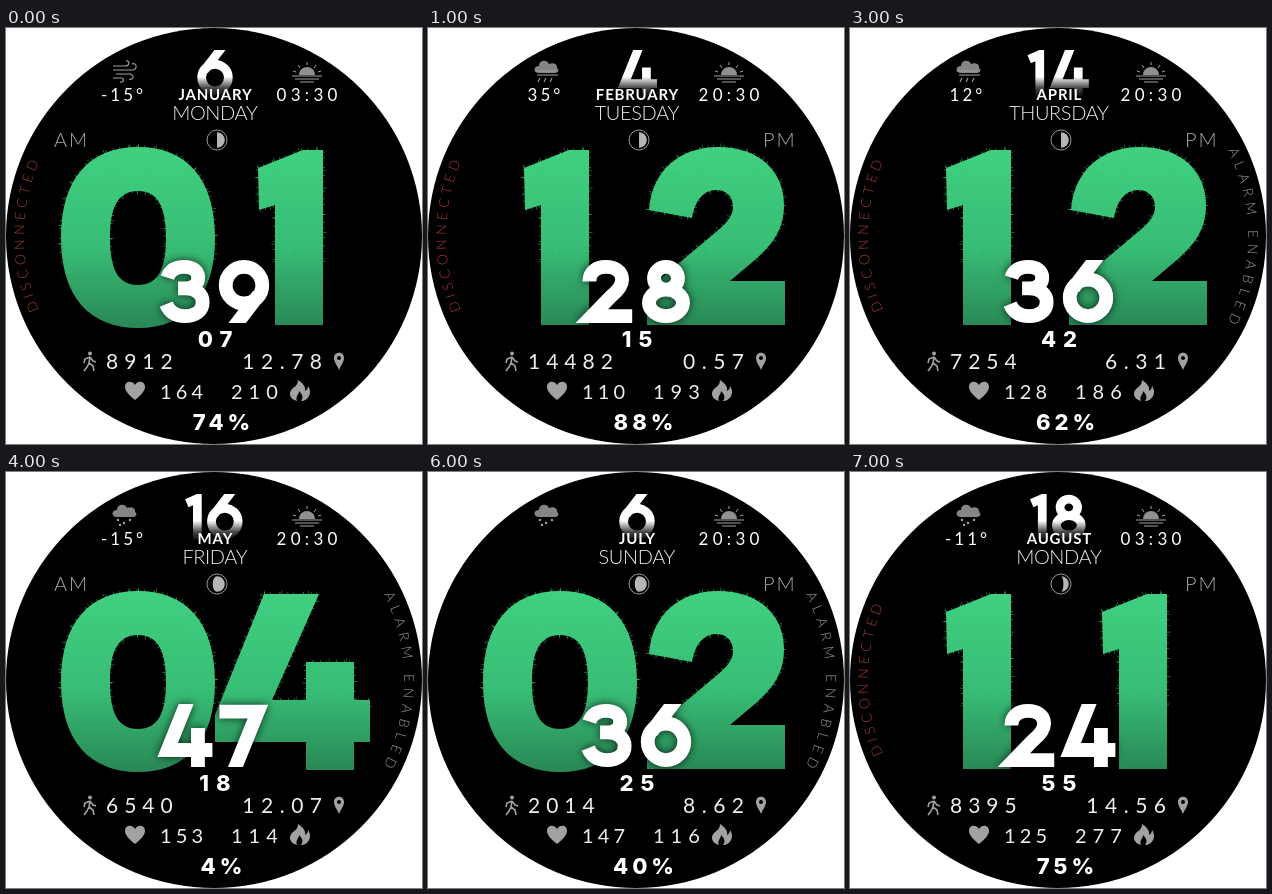
An HTML page with a canvas that plays this animation: 416x416 px, repeating every 8 s.

```html
<!DOCTYPE html>
<html lang="en">
<head>
<meta charset="utf-8">
<title>Watch face</title>
<style>
html, body { margin: 0; width: 100%; height: 100%; overflow: hidden; background: #fff; }
canvas { display: block; width: 416px; height: 416px; }
</style>
</head>
<body>
<canvas id="face" width="416" height="416"></canvas>
<script>
const SIZE = 416, STEP = 1000;
const ctx = document.getElementById('face').getContext('2d');
const layer = document.createElement('canvas');
layer.width = layer.height = SIZE;
const layerCtx = layer.getContext('2d');
const GREY = '#a2a2a2';

// day, month, weekday, temperature, sky, sun time, half of day, hour, minute, second,
// steps, distance, pulse, calories, battery, moon, disconnected, alarm
const KEYS = 'day month weekday temp sky sun half hour min sec steps dist pulse kcal battery moon off alarm'.split(' ');
const states = [
  '6|JANUARY|MONDAY|-15°|wind|03:30|AM|01|39|07|8912|12.78|164|210|74|0|1|',
  '4|FEBRUARY|TUESDAY|35°|rain|20:30|PM|12|28|15|14482|0.57|110|193|88|0|1|',
  '5|MARCH|WEDNESDAY|4°|snow|03:30|AM|01|48|26|12103|9.49|140|101|47|0|1|',
  '14|APRIL|THURSDAY|12°|rain|20:30|PM|12|36|42|7254|6.31|128|186|62|0|1|1',
  '16|MAY|FRIDAY|-15°|snow|20:30|AM|04|47|18|6540|12.07|153|114|4|0.55||1',
  '8|JUNE|SATURDAY|21°|snow|03:30|AM|01|24|33|9308|4.85|136|152|56|0.55|1|1',
  '6|JULY|SUNDAY||snow|20:30|PM|02|36|25|2014|8.62|147|116|40|0.55||1',
  '18|AUGUST|MONDAY|-11°|snow|03:30|PM|11|24|55|8395|14.56|125|277|75|-0.3|1|'
].map(row => Object.fromEntries(row.split('|').map((v, i) => [KEYS[i], v])));

// Strokes in a box 100 units tall: [width, path]
const digits = {
  1: [34, 'M0 20 L23 10 V100'],
  2: [80, 'M12 34 C12 18 24 11 38 11 C54 11 64 19 64 31 C64 42 56 50 46 58 L16 89 H80'],
  3: [78, 'M11 28 C15 16 25 11 38 11 C52 11 60 18 60 28 C60 39 50 45 40 45 H28 M40 45 C56 45 67 54 67 67 C67 81 55 89 39 89 C24 89 14 82 9 70'],
  4: [87, 'M47 -4 L16 73 H87 M64 38 V100'],
  5: [76, 'M69 11 H25 L20 48 C26 43 32 41 40 41 C55 41 65 51 65 65 C65 80 54 89 38 89 C25 89 15 83 10 73'],
  6: [80, 'M57 -8 L17 44 M69 60 A29 29 0 1 1 11 60 A29 29 0 1 1 69 60'],
  7: [78, 'M0 12 H61 L23 106'],
  8: [76, 'M57 29 A19 18 0 1 1 19 29 A19 18 0 1 1 57 29 M65 68 A27 21 0 1 1 11 68 A27 21 0 1 1 65 68'],
  9: [80, 'M23 108 L63 56 M69 40 A29 29 0 1 1 11 40 A29 29 0 1 1 69 40']
};
for (const key in digits) digits[key][1] = new Path2D(digits[key][1]);

const hours = {
  zero: 'M132 119 C181 119 209 151 209 210 C209 268 181 300 132 300 C83 300 55 268 55 210 C55 151 83 119 132 119 Z M132 163 C112 163 104 179 104 210 C104 241 112 257 132 257 C152 257 160 241 160 210 C160 179 152 163 132 163 Z',
  one: 'M252 140 L297 122 H317 V297 H269 V177 L253 182 Z',
  two: 'M221 182 C224 142 252 119 290 119 C331 119 356 143 356 177 C356 201 345 216 328 231 L302 253 H357 V297 H219 V262 L288 204 C299 195 305 188 305 179 C305 168 298 162 288 162 C275 162 267 173 264 190 Z',
  four: 'M258 122 H313 L266 228 H300 V190 H348 V228 H364 V270 H348 V298 H300 V270 H209 V243 Z'
};
const hourPaths = [hours.zero, hours.one, hours.two, , hours.four].map(d => new Path2D(d));

const green = ctx.createLinearGradient(0, 120, 0, 299);
green.addColorStop(0, '#40d080');
green.addColorStop(0.55, '#38bd75');
green.addColorStop(1, '#298856');

function text(value, x, y, font, { color = '#fff', align = 'left', gap = 0 } = {}) {
  ctx.font = font;
  ctx.fillStyle = color;
  ctx.letterSpacing = gap + 'px';
  ctx.textAlign = 'left';
  const width = ctx.measureText(value).width - gap;
  const shift = { left: 0, center: width / 2, right: width }[align];
  ctx.fillText(value, x - shift, y);
  ctx.letterSpacing = '0px';
}

const lato = (weight, size) => `${weight} ${size}px Lato, sans-serif`;
const heavy = size => `800 ${size}px Inter, sans-serif`;

function line(d, width = 1.2, color = GREY) {
  ctx.strokeStyle = color;
  ctx.lineWidth = width;
  ctx.stroke(new Path2D(d));
}

function shape(d, color = GREY) {
  ctx.fillStyle = color;
  ctx.fill(new Path2D(d));
}

function dot(x, y, r, color = GREY) {
  ctx.fillStyle = color;
  ctx.beginPath();
  ctx.arc(x, y, r, 0, Math.PI * 2);
  ctx.fill();
}

function digit(c, char, x, y, height, weight, color) {
  const [width, path] = digits[char];
  c.save();
  c.translate(x, y);
  c.scale(height / 100, height / 100);
  c.beginPath();
  c.rect(-10, 0, width + 20, 100);
  c.clip();
  c.strokeStyle = color;
  c.lineWidth = weight;
  c.miterLimit = 6;
  c.stroke(path);
  c.restore();
}

function drawDate(day) {
  const scale = 0.46, gap = 4;
  const widths = [...day].map(ch => digits[ch][0] * scale);
  let x = 209 - (widths.reduce((a, b) => a + b) + gap * (day.length - 1)) / 2;
  const fade = ctx.createLinearGradient(0, 0, 0, 100);
  fade.addColorStop(0, '#fff');
  fade.addColorStop(0.58, '#fff');
  fade.addColorStop(0.82, '#484848');
  fade.addColorStop(1, '#0c0c0c');
  [...day].forEach((ch, i) => {
    digit(ctx, ch, x, 22, 46, 19, fade);
    x += widths[i] + gap;
  });
}

function drawHour(value) {
  [...value].forEach((ch, i) => {
    const path = hourPaths[ch];
    ctx.save();
    if (i === 0 && ch !== '0') ctx.translate(-156, 0);
    ctx.fillStyle = green;
    ctx.fill(path, 'evenodd');
    // Short bristles along the upper edges
    ctx.beginPath();
    ctx.rect(0, 110, SIZE, 126);
    ctx.clip();
    ctx.strokeStyle = green;
    ctx.globalAlpha = 0.65;
    for (const [width, dash] of [[4, [0.8, 5, 0.6, 9, 1, 7]], [7, [0.6, 17, 0.7, 26]]]) {
      ctx.lineWidth = width;
      ctx.setLineDash(dash);
      ctx.stroke(path);
    }
    // Fine specks in the fill
    ctx.clip(path, 'evenodd');
    let seed = 7;
    const random = () => (seed = seed * 16807 % 2147483647) / 2147483647;
    ctx.globalAlpha = 0.35;
    for (let n = 0; n < 260; n++) {
      ctx.fillStyle = n % 2 ? '#2fa868' : '#63dc98';
      ctx.fillRect(50 + random() * 320, 120 + random() * 116, 1, 1);
    }
    ctx.restore();
  });
}

function drawMinute(value) {
  layerCtx.clearRect(0, 0, SIZE, SIZE);
  [...value].forEach((ch, i) => {
    const x = [179, 238][i] - digits[ch][0] * 0.315;
    digit(layerCtx, ch, x, 232, 63, 22, '#fff');
  });
  ctx.save();
  ctx.shadowColor = 'rgba(0,0,0,.75)';
  ctx.shadowBlur = 8;
  ctx.drawImage(layer, 0, 0);
  ctx.restore();
}

function arcText(value, middle, gap, color) {
  const radius = 190;
  ctx.font = lato(300, 14);
  ctx.fillStyle = color;
  ctx.textAlign = 'center';
  const widths = [...value].map(ch => ctx.measureText(ch).width + gap);
  let angle = middle - widths.reduce((a, b) => a + b) / radius / 2;
  [...value].forEach((ch, i) => {
    const half = widths[i] / radius / 2;
    angle += half;
    ctx.save();
    ctx.translate(208, 208);
    ctx.rotate(angle + Math.PI / 2);
    ctx.fillText(ch, 0, -radius);
    ctx.restore();
    angle += half;
  });
}

function drawSky(kind) {
  if (kind === 'wind') {
    line('M107 38 H119 C124 38 124 32 120 33 M107 42 H126 C132 42 131 34 126 36 M110 46 H123 C129 46 128 53 123 51 M107 50 H115 C119 50 118 55 114 54', 1.1);
    return;
  }
  shape('M111 45 C105 45 105 38 111 38 C111 32 119 31 121 36 C126 34 130 37 129 40 C132 42 130 45 127 45 Z', '#858585');
  if (kind === 'rain') {
    line('M107 43 H128 M109 47 H130 M112 50 L110 54 M118 50 L116 54 M124 50 L122 54', 1.1);
  } else {
    [[112, 48], [118, 51], [124, 48], [114, 53]].forEach(([x, y]) => dot(x, y, 1.2));
  }
}

function drawSunIcon() {
  shape('M293 47 A8 8 0 0 1 309 47 Z', '#909090');
  line('M286 48 H316 M289 51 H313 M294 54 H308', 1.1);
  line('M301 34 V37 M292 37 L294 40 M310 37 L308 40 M287 43 L290 44 M315 43 L312 44', 1);
}

function drawMoon(edge) {
  const x = 211, y = 112, r = 7.8;
  ctx.strokeStyle = '#999';
  ctx.lineWidth = 1;
  ctx.beginPath();
  ctx.arc(x, y, 10, 0, Math.PI * 2);
  ctx.stroke();
  ctx.fillStyle = '#b5b5b5';
  ctx.beginPath();
  ctx.arc(x, y, r, -Math.PI / 2, Math.PI / 2);
  ctx.ellipse(x, y, Math.abs(edge) * r, r, 0, Math.PI / 2, -Math.PI / 2, edge < 0);
  ctx.fill();
}

function drawIcons() {
  dot(84, 325.5, 2);
  line('M84 329 L83 335 L87 338 L88 343 M83 335 L81 339 L78 343 M84 329 L79 331 L78 335 M84 329 L87 333 L90 334', 1.6);
  shape('M129 372 C123 367 119 363 119 359 C119 353 126 352 129 357 C132 352 139 353 139 359 C139 363 135 367 129 372 Z');
  shape('M292 352 C297 355 300 359 299 363 C301 362 302 360 302 358 C307 365 302 373 295 373 C298 369 296 366 293 363 C293 367 289 368 291 373 C283 371 282 364 287 360 C290 358 292 356 292 352 Z');
  shape('M333 342 C331 337 328 334 328 330 C328 323 338 323 338 330 C338 334 335 337 333 342 Z');
  dot(333, 330, 2, '#000');
}

function draw(s) {
  ctx.fillStyle = '#fff';
  ctx.fillRect(0, 0, SIZE, SIZE);
  dot(208, 208, 208, '#000');

  drawSky(s.sky);
  drawSunIcon();
  text(s.temp, 116, 72.5, lato(400, 17), { align: 'center', gap: 3 });
  text(s.sun, 301, 72.5, lato(400, 17), { align: 'center', gap: 4.3 });
  drawDate(s.day);
  text(s.month, 209, 72, lato(700, 15), { align: 'center', gap: 0.8 });
  text(s.weekday, 209, 92, lato(300, 20), { align: 'center', gap: -0.4, color: '#eee' });
  drawMoon(+s.moon);
  text(s.half, s.half === 'AM' ? 48 : 335, 119, lato(300, 20), { gap: 2, color: '#aaa' });

  if (s.off) arcText('DISCONNECTED', Math.PI, 4, '#a03a34');
  if (s.alarm) arcText('ALARM ENABLED', 0, 5.4, '#999');

  drawHour(s.hour);
  drawMinute(s.min);
  text(s.sec, 209, 319, heavy(22), { align: 'center', gap: 7 });

  drawIcons();
  const soft = '#eee';
  text(s.steps, 100, 341, lato(400, 21), { gap: 6, color: soft });
  text(s.dist, 316, 341, lato(400, 21), { align: 'right', gap: 6.5, color: soft });
  text(s.pulse, 154, 371, lato(400, 20), { gap: 4.2, color: soft });
  text(s.kcal, 225, 371, lato(400, 20), { gap: 6, color: soft });
  text(s.battery + '%', 215.5, 402, heavy(22), { align: 'center', gap: 4 });
}

function tick() {
  draw(states[Math.floor(performance.now() / STEP) % states.length]);
  requestAnimationFrame(tick);
}
tick();
</script>
</body>
</html>
```
